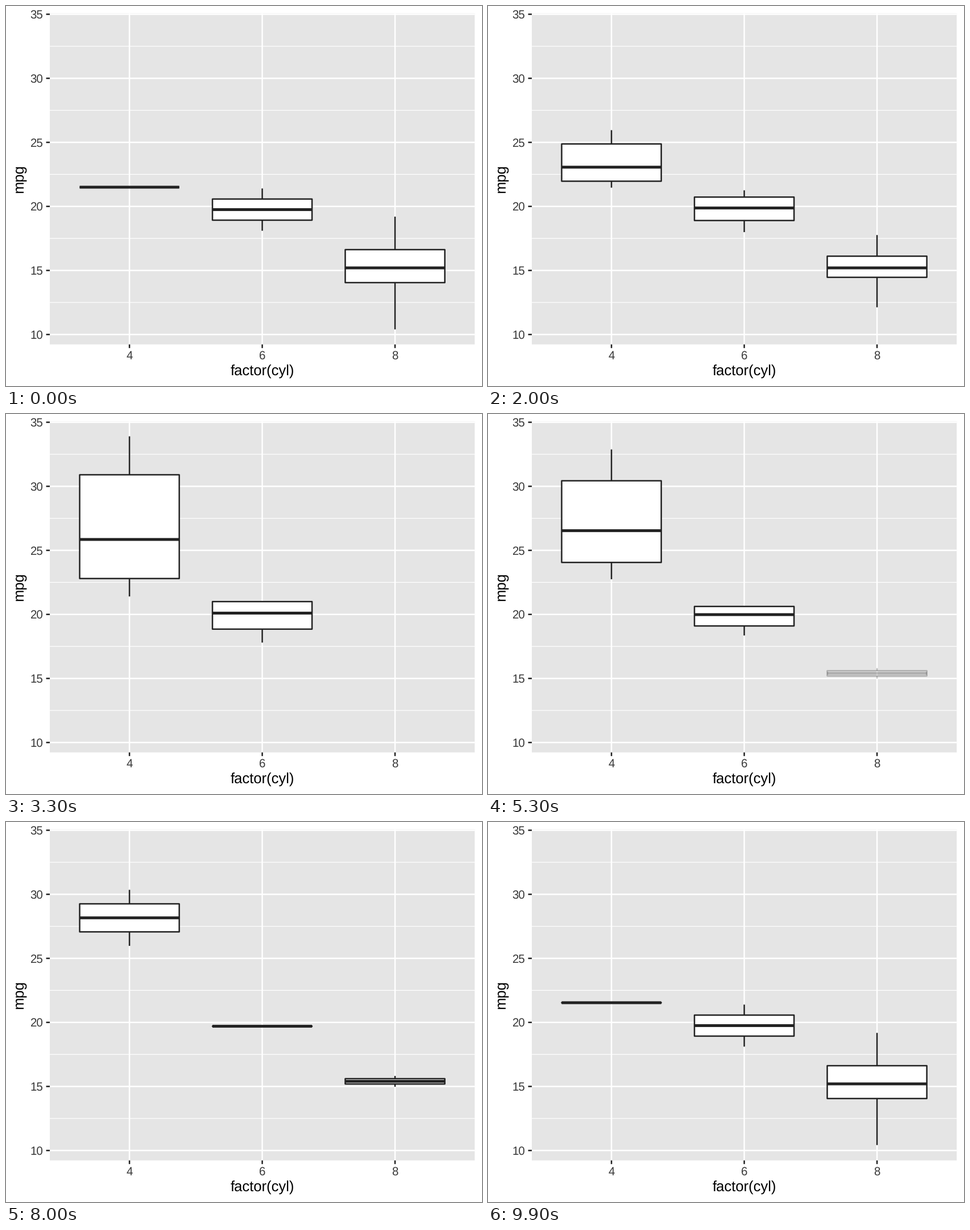
Recreate the animation shown at these times as a matplotlib script. Size 837x669 px, loop 10 s.

```python
import math

import matplotlib.pyplot as plt
import numpy as np
from matplotlib.animation import FuncAnimation
from matplotlib.patches import Rectangle

W, H, DPI = 837, 669, 100
PX = 72 / DPI                       # points per pixel
LEFT, TOP, RIGHT, BOTTOM = 77.0, 12.85, 824.15, 595.8
Y_MIN, Y_MAX = 9.225, 35.075
TICK = 6.42
THIN, LINE, THICK = 1.25, 2.5, 5.0
PANEL, INK, LABEL = "#e5e5e5", "#222222", "#3a3a3a"
CYLS = (4, 6, 8)

# Five-number summaries (min, q1, median, q3, max) per gear and cylinder count
GEAR3 = {4: (21.5,) * 5,
         6: (18.1, 18.925, 19.75, 20.575, 21.4),
         8: (10.4, 14.05, 15.2, 16.625, 19.2)}
GEAR4 = {4: (21.4, 22.8, 25.85, 30.9, 33.9),
         6: (17.8, 18.85, 20.1, 21.0, 21.0)}
GEAR5 = {4: (26.0, 27.1, 28.2, 29.3, 30.4),
         6: (19.7,) * 5,
         8: (15.0, 15.2, 15.4, 15.6, 15.8)}

# Last still frame, first frame of the next state, and the two states
MOVES = ((11, 33, GEAR3, GEAR4),
         (45, 67, GEAR4, GEAR5),
         (79, 100, GEAR5, GEAR3))

plt.rcParams["font.family"] = "Liberation Sans"
plt.rcParams["text.hinting"] = "none"

UNIT = (RIGHT - LEFT) / 3.2


def x_pos(i):
    return LEFT + (0.6 + i) * UNIT


def y_pos(v):
    return TOP + (Y_MAX - v) * (BOTTOM - TOP) / (Y_MAX - Y_MIN)


# The small surplus keeps the pixel size from rounding down
fig = plt.figure(figsize=((W + 0.01) / DPI, (H + 0.01) / DPI), dpi=DPI,
                 facecolor="white")
ax = fig.add_axes([0, 0, 1, 1])
ax.set_xlim(0, W)
ax.set_ylim(H, 0)
ax.axis("off")


def stroke(xs, ys, color, width, z):
    line, = ax.plot(xs, ys, color=color, lw=width * PX, zorder=z,
                    solid_capstyle="butt", snap=False)
    return line


def write(x, y, s, size, color, ha="center", **kw):
    ax.text(x, y, s, fontsize=size * PX, color=color, ha=ha, va="baseline", **kw)


def draw_axes():
    ax.add_patch(Rectangle((LEFT, TOP), RIGHT - LEFT, BOTTOM - TOP,
                           fc=PANEL, lw=0, zorder=0, snap=False))
    for v in np.arange(12.5, 35, 5):
        stroke([LEFT, RIGHT], [y_pos(v)] * 2, "white", THIN, 1)
    for v in range(10, 36, 5):
        y = y_pos(v)
        stroke([LEFT, RIGHT], [y, y], "white", LINE, 1)
        stroke([LEFT - TICK, LEFT], [y, y], INK, LINE, 1)
        write(65.5, y + 7.35, str(v), 20.53, LABEL, ha="right")
    for i, cyl in enumerate(CYLS):
        x = x_pos(i)
        stroke([x, x], [TOP, BOTTOM], "white", LINE, 1)
        stroke([x, x], [BOTTOM, BOTTOM + TICK], INK, LINE, 1)
        write(x, 622, str(cyl), 20.53, LABEL)
    write((LEFT + RIGHT) / 2, 651, "factor(cyl)", 25.67, "black")
    write(31.4, (TOP + BOTTOM) / 2, "mpg", 25.67, "black",
          rotation=90, rotation_mode="anchor")


class Box:
    def __init__(self, i):
        x, half = x_pos(i), 0.375 * UNIT
        self.lower = stroke([x, x], [0, 0], INK, LINE, 3)
        self.upper = stroke([x, x], [0, 0], INK, LINE, 3)
        self.body = Rectangle((x - half, 0), 2 * half, 0, fc="white", ec=INK,
                              lw=LINE * PX, joinstyle="round", zorder=4, snap=False)
        ax.add_patch(self.body)
        self.mid = stroke([x - half, x + half], [0, 0], INK, THICK, 5)
        self.parts = (self.lower, self.upper, self.body, self.mid)

    def update(self, stats, alpha):
        for part in self.parts:
            part.set_visible(stats is not None)
        if stats is None:
            return
        low, q1, med, q3, high = (y_pos(v) for v in stats)
        self.lower.set_ydata([q1, low])
        self.upper.set_ydata([q3, high])
        self.body.set_y(q3)
        self.body.set_height(q1 - q3)
        self.mid.set_ydata([med, med])
        for part in self.parts:
            part.set_alpha(alpha)


def blend(a, b, e):
    """Morph between summaries; shrink to the median on exit, fade on enter."""
    if a is None and b is None:
        return None, 1
    if a is None:
        return (b, e) if e > 0 else (None, 1)
    if b is None:
        if e >= 1:
            return None, 1
        b = (a[2],) * 5
    return [p + (q - p) * e for p, q in zip(a, b)], 1


def state_at(frame):
    for start, end, a, b in MOVES:
        if frame < end:
            t = max(0, (frame - start) / (end - start))
            return a, b, (1 - math.cos(math.pi * t)) / 2
    return GEAR3, GEAR3, 0


draw_axes()
boxes = {cyl: Box(i) for i, cyl in enumerate(CYLS)}


def update(frame):
    a, b, e = state_at(frame)
    for cyl, box in boxes.items():
        box.update(*blend(a.get(cyl), b.get(cyl), e))
    return [p for box in boxes.values() for p in box.parts]


def init():
    return update(0)


anim = FuncAnimation(fig, update, frames=100, init_func=init, interval=100,
                     repeat=True, repeat_delay=0, blit=False)
plt.show()
```
